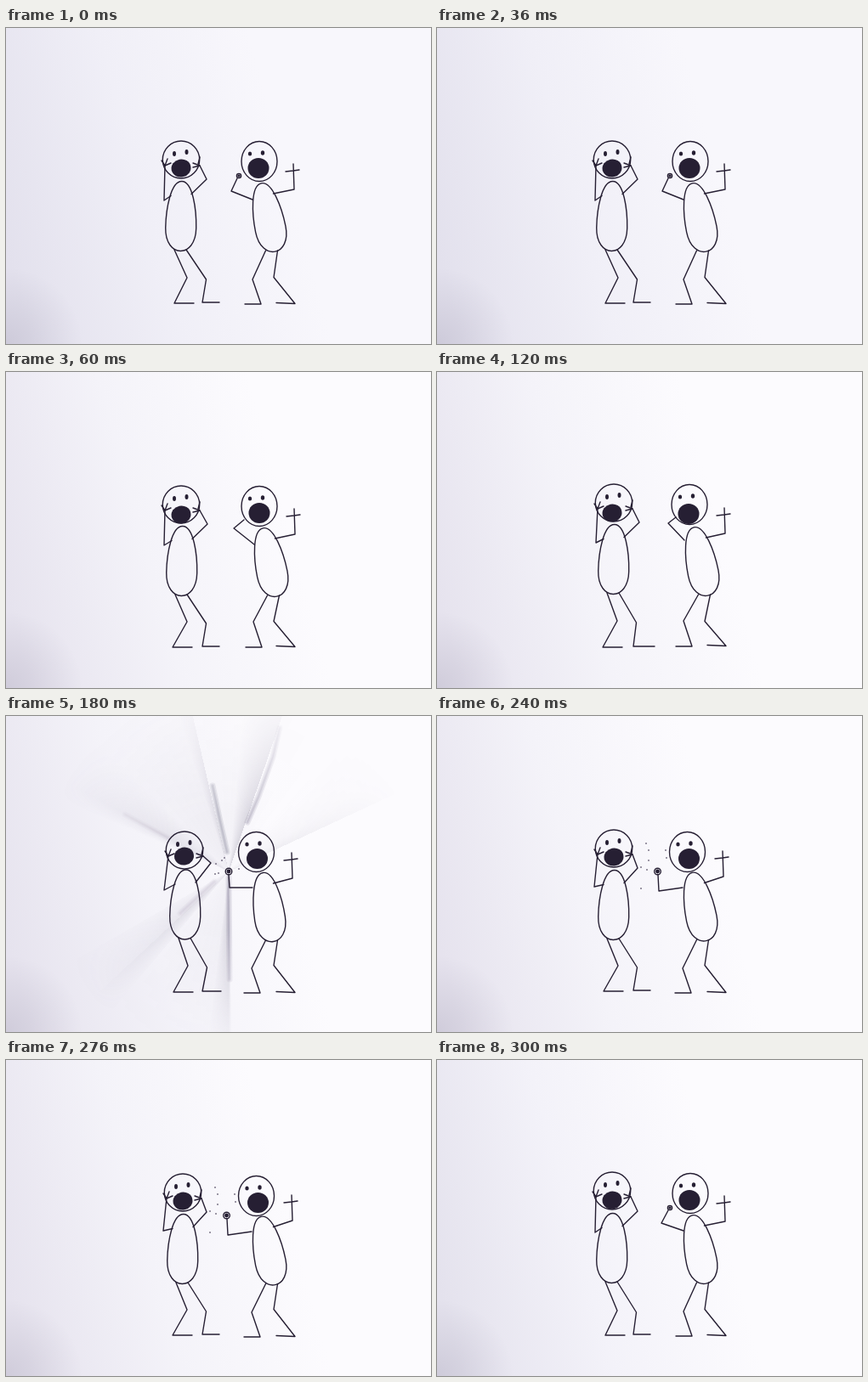
An HTML page with a canvas for the animation above (0.36 s loop, 500 by 372 pixels).

```html
<!DOCTYPE html>
<html lang="en">
<head>
<meta charset="utf-8">
<title>Screaming doodles</title>
<style>
html, body { margin: 0; width: 100%; height: 100%; overflow: hidden; background: #f8f7fc; }
canvas { display: block; }
</style>
</head>
<body>
<canvas id="stage" width="500" height="372"></canvas>
<script>
const ctx = document.getElementById('stage').getContext('2d');
const INK = '#261f33';
const STEP = 60;

// Resting pose; the other poses only state what differs.
const rest = {
  paper: ['#e3e1ed', '#f0eff7', '#f8f7fc'],
  headL: [206, 155], mouthL: [206, 165], bodyL: [206, 221.5], elbowsL: [186, 203, 236, 178],
  kneeL: [213, 294], footL: [198, 324], toeL: 251,
  headR: [298, 157], mouthR: [297, 165], bodyR: [308.5, 223], tilt: -0.2,
  throwArm: [290, 202, 265, 192, 272, 177], fist: [274, 174, 2.6], elbowR: [339, 190],
  kneeR: [290, 296], footR: [300, 325], dots: []
};
const bright = ['#e6e3ee', '#f4f3f9', '#fcfbfe'];
const pose = changes => ({ ...rest, paper: bright, ...changes });
const poses = [
  rest,
  pose({
    headL: [206, 156], mouthL: [206, 168], bodyL: [207, 222.5], elbowsL: [186, 204, 237, 179],
    footL: [196, 324], headR: [298, 158], mouthR: [298, 166], bodyR: [310.5, 224],
    throwArm: [292, 203, 268, 184, 280, 174], fist: null, elbowR: [340, 191],
    kneeR: [291, 294], footR: [301, 324]
  }),
  pose({
    headL: [208, 154], mouthL: [206, 166], bodyL: [208, 220.5], elbowsL: [187, 201, 238, 177],
    kneeL: [212, 293], footL: [195, 324], toeL: 256,
    headR: [297, 156], mouthR: [296, 167], bodyR: [310.5, 223],
    throwArm: [291, 198, 272, 178, 281, 171], fist: null,
    kneeR: [290, 293], footR: [300, 323]
  }),
  pose({
    headL: [210, 158], mouthL: [209.5, 165], bodyL: [211, 222], elbowsL: [186, 205, 241, 173],
    kneeL: [214, 294], footL: [197, 325], toeL: 253,
    headR: [294.5, 160], mouthR: [295.5, 168], bodyR: [308.5, 225], tilt: -0.15,
    throwArm: [290, 202, 263, 202, 262, 187], fist: [262, 183, 3.8], elbowR: [337, 191],
    kneeR: [289, 297], footR: [299, 326], folds: true,
    dots: [257, 167, 254, 170, 247, 174, 246, 186, 250, 185, 274, 180]
  }),
  pose({
    headL: [208, 156], mouthL: [208, 166], bodyL: [208, 222.5], elbowsL: [185, 201, 236, 179],
    footL: [196, 324], headR: [294.5, 160], mouthR: [296.5, 168], bodyR: [308.5, 224.5],
    throwArm: [289, 202, 261, 206, 260, 187], fist: [259.5, 183, 3.8], elbowR: [337, 189],
    kneeR: [289, 297], footR: [299, 326],
    dots: [246, 150, 249, 158, 249, 170, 240, 178, 247, 181, 240, 203, 269, 158, 270, 167]
  }),
  pose({
    paper: ['#e4e2ed', '#f3f2f9', '#fcfbfe'], headL: [206, 154],
    kneeL: [212, 295], throwArm: [290, 201, 264, 192, 272, 177]
  })
];

function line(...p) {
  ctx.beginPath();
  for (let i = 0; i < p.length; i += 2) ctx.lineTo(p[i], p[i + 1]);
  ctx.stroke();
}

function oval(x, y, rx, ry, filled, turn = 0) {
  ctx.beginPath();
  ctx.ellipse(x, y, rx, ry, turn, 0, Math.PI * 2);
  filled ? ctx.fill() : ctx.stroke();
}

// Egg-shaped torso, narrow at the neck.
function torso([x, y], tilt) {
  ctx.save();
  ctx.translate(x, y);
  ctx.rotate(tilt);
  ctx.beginPath();
  ctx.moveTo(0, -41);
  ctx.bezierCurveTo(13, -41, 18, -8, 18, 14);
  ctx.bezierCurveTo(18, 50, -18, 50, -18, 14);
  ctx.bezierCurveTo(-18, -8, -13, -41, 0, -41);
  ctx.stroke();
  ctx.restore();
}

function fill(target, gradient, ...stops) {
  stops.forEach(([at, colour]) => gradient.addColorStop(at, colour));
  target.fillStyle = gradient;
  target.fillRect(0, 0, 500, 372);
}

function drawPaper([left, middle, right]) {
  fill(ctx, ctx.createLinearGradient(0, 260, 330, 170), [0, left], [0.5, middle], [1, right]);
  fill(ctx, ctx.createRadialGradient(0, 372, 0, 0, 372, 90),
    [0, 'rgba(90,82,115,.16)'], [1, 'rgba(90,82,115,0)']);
}

// Shading around the fist: [angle in degrees, shade before, shade after]
const creases = [
  [0, 0, 0], [89, 0, 0.02], [90, 0.2, 0.2], [97, 0.05, 0.04], [130, 0.01, 0.03],
  [137, 0.12, 0.08], [150, 0.02, 0], [203, 0, 0], [209, 0.1, 0.1], [225, 0.03, 0.03],
  [252, 0.05, 0.05], [257, 0.14, 0.02], [275, 0.03, 0.03], [289, 0.18, 0.01],
  [310, 0, 0], [328, 0.03, 0.03], [335, 0.07, 0], [360, 0, 0]
];
const folds = makeFolds();

function makeFolds() {
  const layer = document.createElement('canvas');
  layer.width = 500;
  layer.height = 372;
  const f = layer.getContext('2d');
  const shade = a => `rgba(70,62,95,${a})`;
  fill(f, f.createConicGradient(0, 262, 183), ...creases.flatMap(
    ([deg, before, after]) => [[deg / 360, shade(before)], [deg / 360, shade(after)]]));
  const ridge = (alpha, ...p) => {
    for (const width of [7, 4, 1.5]) {
      f.beginPath();
      for (let i = 0; i < p.length; i += 2) f.lineTo(p[i], p[i + 1]);
      f.lineWidth = width;
      f.strokeStyle = shade(alpha);
      f.stroke();
    }
  };
  f.lineJoin = f.lineCap = 'round';
  ridge(0.11, 243, 82, 251, 120, 260, 160);
  ridge(0.1, 322, 14, 314, 48, 297, 95, 284, 125);
  ridge(0.1, 262, 190, 263, 310);
  ridge(0.04, 140, 116, 190, 143);
  ridge(0.04, 245, 195, 205, 232);
  f.globalCompositeOperation = 'destination-in';
  fill(f, f.createRadialGradient(262, 183, 70, 262, 183, 220), [0, '#000'], [1, '#0000']);
  return layer;
}

function drawLeft(p) {
  const [hx, hy] = p.headL, [bx, by] = p.bodyL, [ax, ay, cx, cy] = p.elbowsL;
  oval(hx, hy, 21.7, 22);
  oval(hx - 8, hy - 7, 2, 3, true);
  oval(hx + 6.5, hy - 9, 2, 3, true);
  oval(...p.mouthL, 11.5, 10.5, true, -0.2);
  torso(p.bodyL, 0.02);
  line(bx - 12, by - 24, ax, ay, hx - 19, hy + 6);
  line(hx - 23, hy + 1, hx - 19, hy + 7, hx - 12, hy + 4);
  line(hx - 19, hy + 7, hx - 16, hy - 1);
  line(bx + 12, by - 26, cx, cy, hx + 22, hy + 7, hx + 14, hy + 4);
  line(hx + 22, hy + 7, hx + 14, hy + 9);
  line(hx + 20, hy + 5, hx + 22, hy - 3);
  const [kx, ky] = p.kneeL, [fx, fy] = p.footL;
  line(bx - 8, by + 39.5, kx, ky, fx, fy, fx + 23, fy);
  line(bx + 6, by + 39.5, kx + 22.5, ky + 2, 231, fy - 1, p.toeL, fy - 1);
}

function drawRight(p) {
  const [hx, hy] = p.headR, [bx, by] = p.bodyR, [ex, ey] = p.elbowR;
  oval(hx, hy, 21, 23.5);
  oval(hx - 11, hy - 9, 2.2, 2.6, true);
  oval(hx + 4, hy - 10, 2.2, 2.8, true);
  oval(...p.mouthR, 12.5, 12, true);
  torso(p.bodyR, p.tilt);
  line(...p.throwArm);
  if (p.fist) {
    const [x, y, r] = p.fist;
    oval(x, y, r, r);
    oval(x, y, r * 0.65, r * 0.65, true);
  }
  line(bx + 6, by - 28, ex, ey, ex - 1, ey - 30);
  line(ex - 10, ey - 21, ex - 1, ey - 22, ex + 6, ey - 23);
  const [fx, fy] = p.footR;
  line(bx - 3, by + 39, ...p.kneeR, fx, fy, fx - 19, fy);
  line(bx + 11, by + 39, 315, 293.5, 340, fy - 0.5, 318, fy - 1.5);
}

function draw(now) {
  const p = poses[Math.floor(now / STEP) % poses.length];
  drawPaper(p.paper);
  if (p.folds) ctx.drawImage(folds, 0, 0);
  ctx.strokeStyle = ctx.fillStyle = INK;
  ctx.lineWidth = 1.4;
  ctx.lineJoin = ctx.lineCap = 'round';
  drawLeft(p);
  drawRight(p);
  ctx.fillStyle = '#6f687c';
  for (let i = 0; i < p.dots.length; i += 2) oval(p.dots[i], p.dots[i + 1], 0.9, 0.9, true);
}

const start = performance.now();
function tick() {
  draw(performance.now() - start);
  requestAnimationFrame(tick);
}
tick();
</script>
</body>
</html>
```
